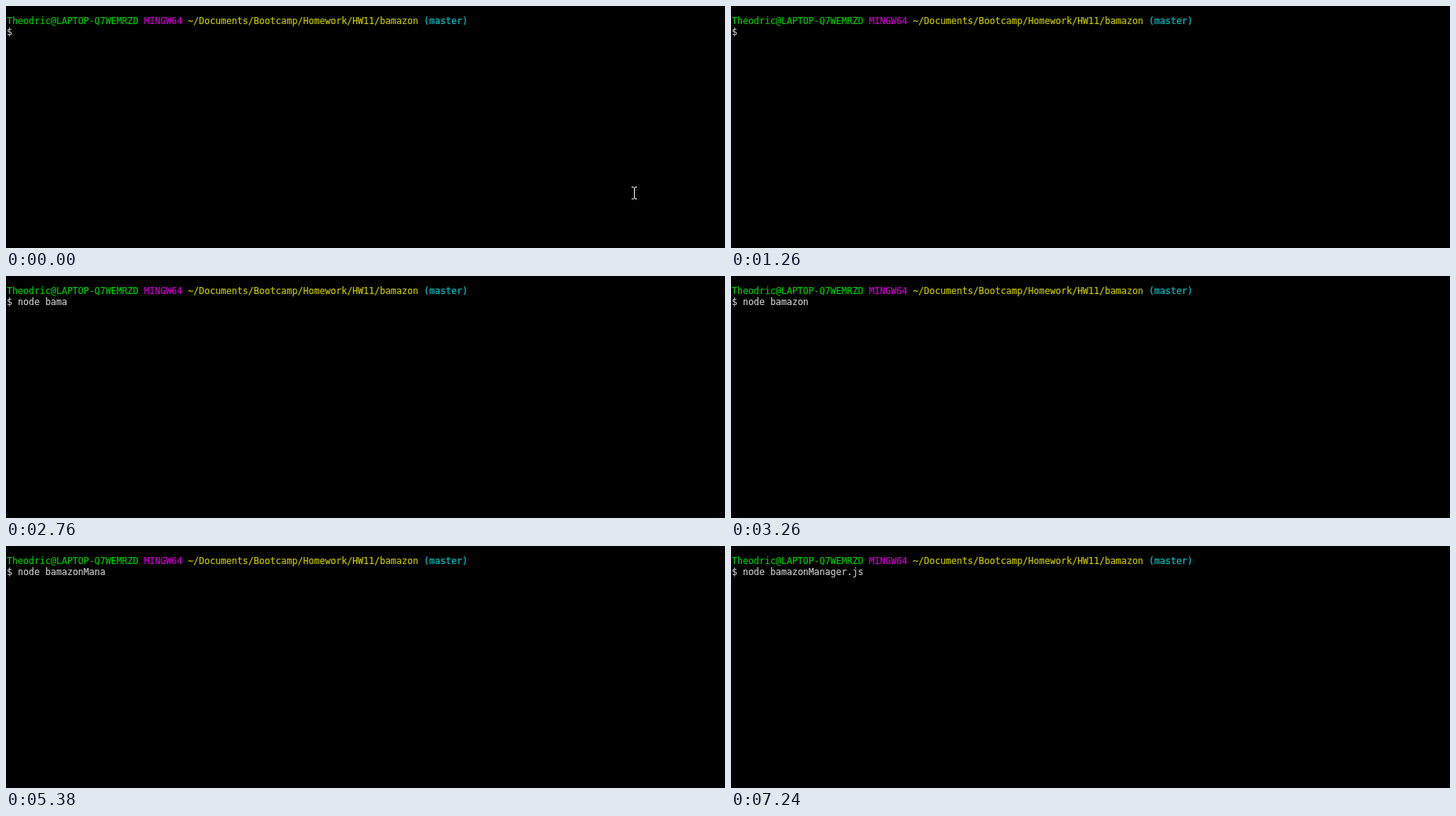
Write an HTML page that moves like this. It is 916 px wide and 308 px high and loops after 8 s.

```html
<!DOCTYPE html>
<html lang="en">
<head>
<meta charset="utf-8">
<style>
  html, body { margin: 0; width: 100%; height: 100%; overflow: hidden; background: #000; }
  pre {
    position: absolute; left: 1px; top: 12px; margin: 0;
    font: 11.628px/14px "DejaVu Sans Mono", monospace;
    font-variant-ligatures: none; color: #c4c4c4;
    -webkit-text-stroke: 0.2px;
  }
  .user { color: #00c400; }
  .system { color: #c400c4; }
  .path { color: #c4c400; }
  .branch { color: #00c4c4; }
  svg { position: absolute; left: 0; top: 0; }
</style>
</head>
<body>
<pre><span class="user">Theodric@LAPTOP-Q7WEMRZD</span> <span class="system">MINGW64</span> <span class="path">~/Documents/Bootcamp/Homework/HW11/bamazon</span> <span class="branch">(master)</span>
$ <span id="typed"></span></pre>
<svg width="916" height="308" shape-rendering="crispEdges">
  <path id="pointer" fill="#fff" d="M-3-8h3v1h1v-1h3v1h-3v14h3v1h-3v-1h-1v1h-3v-1h3v-14h-3z"/>
</svg>
<script>
const LOOP = 8000;
const BEAT = 125;
const LEAD = 10;          // beats land slightly early
const TYPING_BEAT = 10;   // the pointer hides and typing begins

// One keystroke per beat; "_" is a pause.
const rhythm = "node __ba_ma_zon" + "_".repeat(11) + "M_an_a_ge_r_____._j_s";

const typed = document.getElementById("typed");
const pointer = document.getElementById("pointer");

function draw(t) {
  const beat = Math.floor((t + LEAD) / BEAT);
  typed.textContent = rhythm.slice(0, Math.max(0, beat - TYPING_BEAT)).replaceAll("_", "");

  // The pointer swings up and left along a parabola, then settles.
  const k = Math.min(beat, 4);
  const x = Math.round(800 - 24.4 * k + 4.92 * k * k);
  const y = Math.round(238 - 23.6 * k + 4.08 * k * k);
  pointer.setAttribute("transform", `translate(${x} ${y})`);
  pointer.setAttribute("visibility", beat < TYPING_BEAT ? "visible" : "hidden");
}

const begin = performance.now();
function tick() {
  draw((performance.now() - begin) % LOOP);
  requestAnimationFrame(tick);
}
tick();
</script>
</body>
</html>
```
